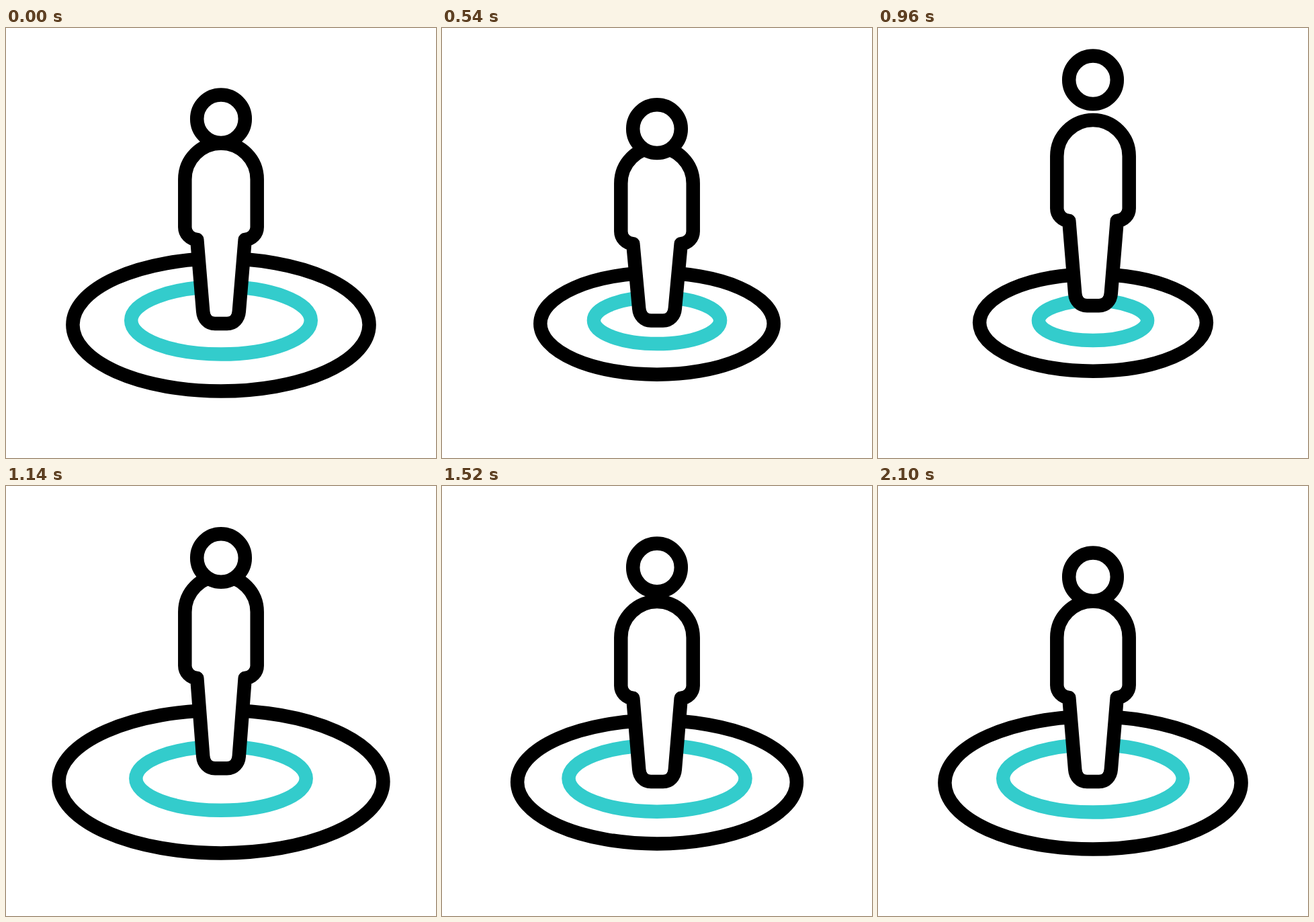
An HTML page that plays this animation: 640 px wide and 640 px high, repeating every 3000 ms.

```html
<!DOCTYPE html>
<html lang="en">
<head>
<meta charset="utf-8">
<title>Jumping figure</title>
<style>
  html, body { margin: 0; width: 100%; height: 100%; overflow: hidden; background: #fff; }
  svg { display: block; width: 100%; height: 100%; }
  svg * { fill: #fff; stroke: #000; stroke-width: 20.5; stroke-linejoin: round; }
  ellipse { fill: none; }
  #inner { stroke: #33cccc; }
</style>
</head>
<body>
<svg viewBox="0 0 640 640">
  <ellipse id="outer" cx="320"/>
  <ellipse id="inner" cx="320" cy="435.3"/>
  <path id="body"/>
  <circle id="head" cx="320" r="35.8"/>
</svg>
<script>
const LOOP = 3000, STEP = 20;

// Half widths of the rings, lift of the outer ring, shifts of the body parts.
const rest = { outer: 220.6, inner: 133.8, lift: 0, shoulder: 0, hip: 0, foot: 0 };
const crouch = { ...rest, outer: 187, inner: 103.6, shoulder: 11.5, hip: 11.2 };
const leap = { ...rest, outer: 92, inner: 35.6, shoulder: -28.3, hip: -24.5, foot: -32.2 };
const stretch = { outer: 245.8, inner: 126.6, lift: 2.6, shoulder: -41, hip: -31.5, foot: -21.4 };
const land = { ...rest, outer: 186.8, inner: 127.7, lift: 1.8, shoulder: 1.1, hip: 2.2 };

const poses = [[80, rest], [460, crouch], [800, leap], [1120, stretch], [1240, land], [1720, rest]];

// The head hangs in the air longer and settles later than the body.
const nods = [[80, 0], [460, 26.8], [800, -58], [1000, -58], [1240, -10.3], [1720, -16], [2080, 0]]
  .map(([time, head]) => [time, { head }]);

const ease = u => u * u * (3 - 2 * u);

function sample(keys, t) {
  const next = keys.findIndex(([time]) => time > t);
  if (next <= 0) return keys[0][1]; // every track ends as it begins
  const [t0, a] = keys[next - 1], [t1, b] = keys[next];
  const k = ease((t - t0) / (t1 - t0));
  const mix = {};
  for (const name in a) mix[name] = a[name] + (b[name] - a[name]) * k;
  return mix;
}

// Left half as drawn, right half mirrored around x = 320.
function bodyPath({ shoulder, hip, foot }) {
  const side = x => {
    const p = (dx, y) => `${x(dx)} ${y}`;
    return {
      arm: p(53.7, 225.3 + shoulder),
      hand: p(53.7, 296.5 + hip),
      palm: [p(53.7, 306.3 + hip), p(46, 314.3 + hip)],
      hip: p(35.7, 315 + hip),
      ankle: p(26.8, 422 + foot),
      heel: [p(26, 432.3 + foot), p(19, 440 + foot)],
      toe: p(9, 440 + foot)
    };
  };
  const l = side(dx => 320 - dx), r = side(dx => 320 + dx);
  return `M${l.arm} A53.7 53.7 0 0 1 ${r.arm}
    L${r.hand} C${r.palm} ${r.hip} L${r.ankle} C${r.heel} ${r.toe}
    L${l.toe} C${[...l.heel].reverse()} ${l.ankle} L${l.hip} C${[...l.palm].reverse()} ${l.hand} Z`;
}

function set(id, attrs) {
  const el = document.getElementById(id);
  for (const name in attrs) el.setAttribute(name, attrs[name]);
}

function draw(t) {
  const pose = sample(poses, t);
  const depth = 0.49 * pose.outer - 9.4;
  set('outer', { rx: pose.outer, ry: depth - pose.lift, cy: 434.4 + 0.075 * depth - pose.lift });
  set('inner', { rx: pose.inner, ry: 0.39 * pose.inner - 1.95 });
  set('body', { d: bodyPath(pose) });
  set('head', { cy: 135.2 + sample(nods, t).head });
}

const start = performance.now();
function tick() {
  const t = (performance.now() - start) % LOOP;
  draw(Math.floor(t / STEP) * STEP);
  requestAnimationFrame(tick);
}
tick();
</script>
</body>
</html>
```
